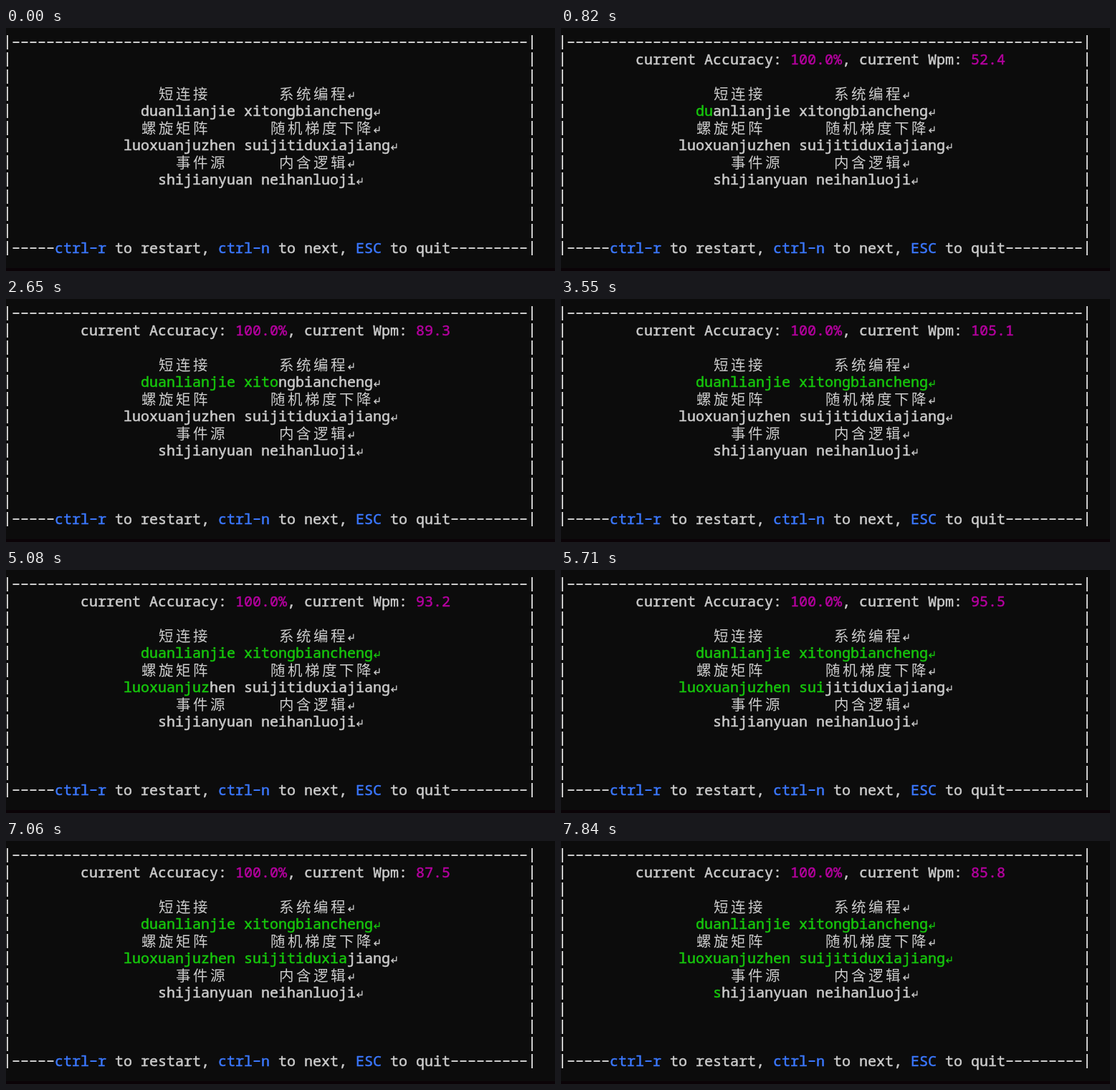
An HTML page for the animation above (8000 ms loop, 766x340 px).

```html
<!DOCTYPE html>
<html lang="zh">
<head>
<meta charset="utf-8">
<title>Typing practice</title>
<style>
html, body { margin: 0; width: 100%; height: 100%; overflow: hidden; background: #0c0c0c; }
svg { display: block; width: 766px; height: 340px; color: #ccc; }
text {
  font: 20px "Noto Sans Mono", "DejaVu Sans Mono", monospace;
  white-space: pre; font-variant-ligatures: none;
  fill: currentColor; stroke: currentColor; stroke-width: .5px;
}
tspan { fill: currentColor; stroke: currentColor; }
.han { font: 20.5px "Noto Sans CJK SC", "Noto Sans CJK", sans-serif; letter-spacing: 3.5px; stroke: none; }
.ok { color: #16c60c; }
.bad { color: #e74856; }
.num { color: #b4009e; }
.key { color: #3b78ff; }
.rule { stroke: currentColor; stroke-width: 2; stroke-dasharray: 9 3; }
.ret { fill: none; stroke: currentColor; stroke-width: 1.3; }
</style>
</head>
<body>
<svg id="term" viewBox="0 0 766 340" xmlns="http://www.w3.org/2000/svg"></svg>
<script>
const LOOP = 8000, COLS = 60;
const term = document.getElementById('term');
const px = col => 12 * col - 4;
const base = row => 27 + 24 * row;

function add(parent, tag, attrs = {}, text = '') {
  const el = document.createElementNS('http://www.w3.org/2000/svg', tag);
  for (const k in attrs) el.setAttribute(k, attrs[k]);
  el.textContent = text;
  parent.append(el);
  return el;
}

const write = (col, row, str = '') => add(term, 'text', { x: px(col), y: base(row) }, str);
const han = (col, row, str) =>
  add(term, 'text', { class: 'han', x: px(col) + 1, y: base(row) + .5 }, str);

function dashes(col, row, n, kind = '') {
  const x = px(col) + 1.5, y = base(row) - 7;
  add(term, 'line', { class: 'rule ' + kind, x1: x, x2: x + 12 * n - 3, y1: y, y2: y });
}

function ret(col, row) {
  const x = px(col) - .7, y = base(row) - 3.5;
  return add(term, 'path', {
    class: 'ret',
    d: `M${x + 9.5} ${y - 6}V${y}H${x + 2.5}M${x + 5.5} ${y - 3}L${x + 2.5} ${y}L${x + 5.5} ${y + 3}`
  });
}

// Frame
add(term, 'rect', { y: 336, width: 766, height: 4, fill: '#0b0307' });
for (let r = 0; r < 13; r++)
  for (const c of [0, COLS + 1])
    add(term, 'rect', { x: px(c) + 5, y: base(r) - 17, width: 2, height: 20, fill: '#ccc' });
dashes(1, 0, COLS);
dashes(1, 12, 5);
dashes(52, 12, 9);

// Footer; the hyphens are painted wide like the rules
const foot = write(6, 12);
function shortcut(letter, col) {
  add(foot, 'tspan', { class: 'key' }, 'ctrl');
  add(foot, 'tspan', { style: 'fill:none;stroke:none' }, '-');
  add(foot, 'tspan', { class: 'key' }, letter);
  dashes(col + 4, 12, 1, 'key');
}
shortcut('r', 6);
add(foot, 'tspan', {}, ' to restart, ');
shortcut('n', 25);
add(foot, 'tspan', {}, ' to next, ');
add(foot, 'tspan', { class: 'key' }, 'ESC');
add(foot, 'tspan', {}, ' to quit');

// Headings: row, left column, left words, right column, right words
[[3, 18, '短连接', 32, '系统编程'],
 [5, 16, '螺旋矩阵', 31, '随机梯度下降'],
 [7, 20, '事件源', 32, '内含逻辑']].forEach(([row, a, left, b, right]) => {
  han(a, row, left);
  han(b, row, right);
  ret(b + 2 * right.length, row);
});

// Lines to type
let total = 0;
const lines = [
  [16, 4, 'duanlianjie xitongbiancheng'],
  [14, 6, 'luoxuanjuzhen suijitiduxiajiang'],
  [18, 8, 'shijianyuan neihanluoji']
].map(([col, row, str]) => {
  const el = write(col, row), from = total;
  total += str.length + 1;
  return {
    str, from,
    ok: add(el, 'tspan', { class: 'ok' }),
    bad: add(el, 'tspan', { class: 'bad' }),
    rest: add(el, 'tspan'),
    end: ret(col + str.length, row)
  };
});

// Status line
const status = write(9, 1);
add(status, 'tspan', {}, 'current Accuracy: ');
const acc = add(status, 'tspan', { class: 'num' });
add(status, 'tspan', {}, ', current Wpm: ');
const wpm = add(status, 'tspan', { class: 'num' });

// Bursts of keys: count, first time, last time
const keys = [
  [1, 100, 100], [2, 730, 850], [2, 1390, 1420], [1, 1570, 1570], [7, 1720, 2230],
  [2, 2440, 2500], [11, 2650, 3400], [2, 3490, 3550], [1, 3700, 3700], [7, 4030, 4570],
  [2, 4840, 4960], [5, 5110, 5410], [5, 5560, 5890], [2, 6070, 6160], [2, 6310, 6430],
  [2, 6550, 6640], [1, 7090, 7090], [5, 7330, 7630], [1, 7840, 7840]
].flatMap(([n, a, b]) => Array.from({ length: n }, (_, i) => n > 1 ? a + (b - a) * i / (n - 1) : a));

// One wrong key and its removal
const SLIP = 6760, ERASE = 7060;

// Seconds on the typing clock at given times
const clock = [[100, .001], [1570, 1.068], [2650, 2.15], [3550, 3.197],
  [4960, 4.893], [6430, 6.527], [7630, 8.2], [7840, 8.531]];

function elapsed(t) {
  let i = 1;
  while (i < clock.length - 1 && t > clock[i][0]) i++;
  const [t0, s0] = clock[i - 1], [t1, s1] = clock[i];
  return s0 + (s1 - s0) * (t - t0) / (t1 - t0);
}

let shown = '';
function draw(t) {
  const n = keys.filter(k => k <= t).length;
  const slip = t >= SLIP && t < ERASE ? 1 : 0;
  const last = Math.max(...[...keys, SLIP, ERASE].filter(k => k <= t));
  const state = n + ':' + last;
  if (state === shown) return;
  shown = state;

  status.style.display = n ? '' : 'none';
  if (n) {
    acc.textContent = (100 * n / (n + slip)).toFixed(1) + '%';
    wpm.textContent = (n * 12 / elapsed(last)).toFixed(1);
    const len = status.textContent.length;
    status.setAttribute('x', px(1 + Math.floor((COLS - len) / 2)));
  }
  for (const { str, from, ok, bad, rest, end } of lines) {
    const done = Math.max(0, n - from);
    const wrong = done ? slip : 0;
    ok.textContent = str.slice(0, done);
    bad.textContent = str.slice(done, done + wrong);
    rest.textContent = str.slice(done + wrong);
    end.classList.toggle('ok', done > str.length);
  }
}

const start = performance.now();
function tick() {
  draw((performance.now() - start) % LOOP);
  requestAnimationFrame(tick);
}
tick();
</script>
</body>
</html>
```
